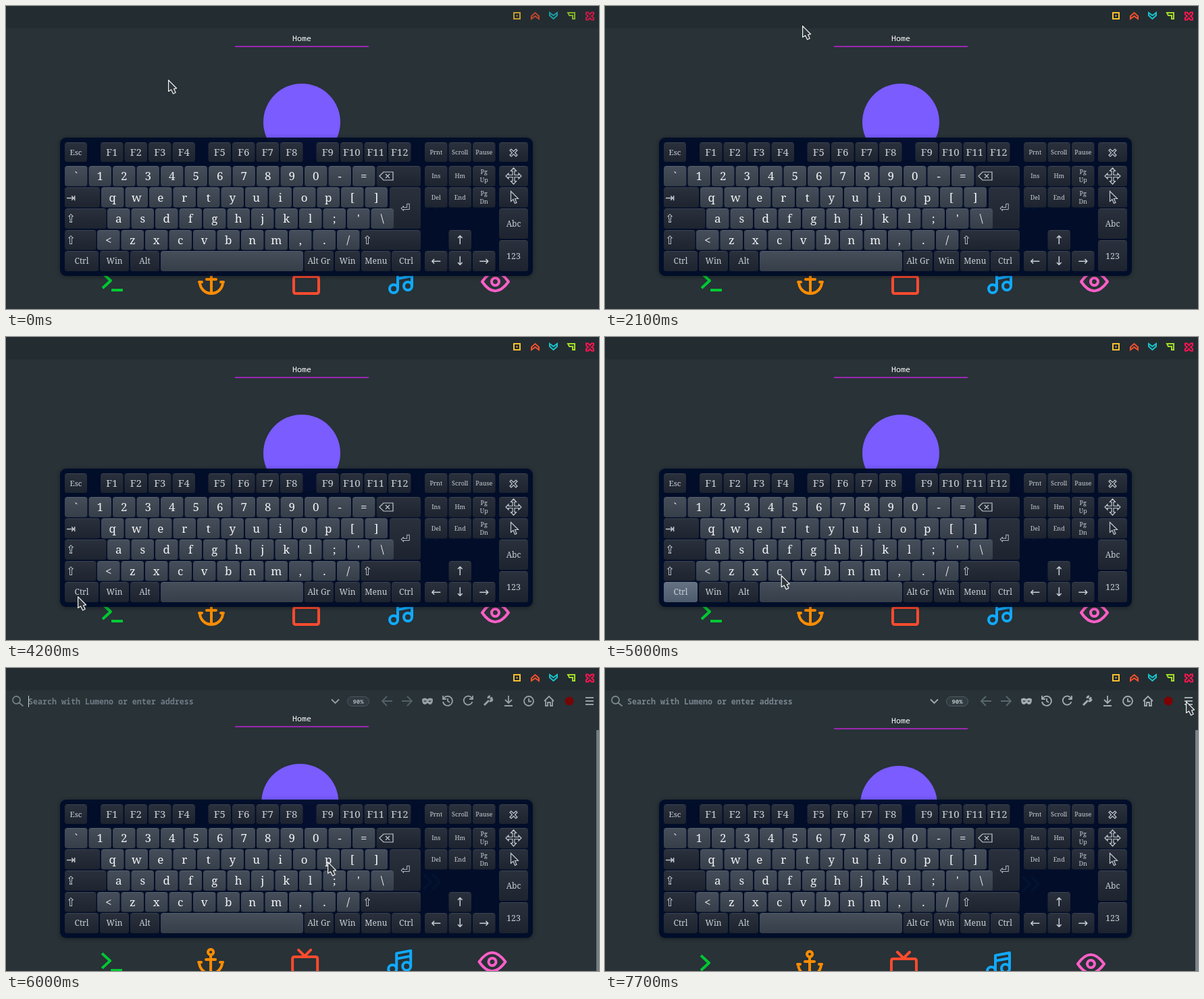
Animation of 878x449 px, one loop 8 s. Source, as an HTML page:

```html
<!DOCTYPE html>
<html lang="en">
<head>
<meta charset="utf-8">
<title>On-screen keyboard</title>
<style>
html, body { margin: 0; width: 100%; height: 100%; overflow: hidden; background: #283237; }
svg { display: block; }
.mono { font-family: "Noto Sans Mono", monospace; font-size: 11.67px; }
#board text, #popup text { font-family: "Noto Serif", "DejaVu Sans", serif; text-anchor: middle; }
#board .sym { font-family: "DejaVu Sans", sans-serif; }
.line { fill: none; stroke-width: 4; stroke-linecap: round; stroke-linejoin: round; }
.tool { fill: none; stroke: #a3adb2; stroke-width: 1.8; }
.glyph { fill: none; stroke: #c4c9cf; stroke-width: 1.2; }
</style>
</head>
<body>
<svg width="878" height="449" viewBox="0 0 878 449">
  <defs>
    <linearGradient id="light" x2="0" y2="1"><stop stop-color="#454e5a"/><stop offset="1" stop-color="#363e49"/></linearGradient>
    <linearGradient id="dark" x2="0" y2="1"><stop stop-color="#2a313d"/><stop offset="1" stop-color="#1d242f"/></linearGradient>
    <linearGradient id="lit" x2="0" y2="1"><stop stop-color="#647283"/><stop offset="1" stop-color="#4d5b6d"/></linearGradient>
    <clipPath id="barClip"><rect id="barArea" y="33" width="878" height="30"/></clipPath>
  </defs>

  <g id="page">
    <circle class="shift" data-dx="3" cx="438" cy="172" r="57" fill="#7a5cff"/>
    <path class="shift line" data-dx="3" stroke="#4af" d="M622 280l10 10-10 10m13-20l10 10-10 10"/>
    <path class="shift line" data-dx="1" style="stroke-linecap:butt" stroke="#00c832" d="M143 396l12 11-12 11M156 421h17"/>
    <path class="shift line" data-dx="1" stroke="#ff8c00" d="M304 398V426M297 405h14M286 409h4M318 409h4M287 409a17 17 0 0 0 34 0M304 390a4 4 0 1 0 .1 0"/>
    <path class="shift line" data-dx="2" stroke="#ff4b2e" d="M429 401h31q3 0 3 3v19q0 3-3 3h-31q-3 0-3-3v-19q0-3 3-3M435 391l9 9 9-9"/>
    <path class="shift line" data-dx="2" stroke="#10aaff" d="M580 419V396l21-4v23M580 404l21-4M580 419a6 6 0 1 0-12 0a6 6 0 1 0 12 0M601 415a6 6 0 1 0-12 0a6 6 0 1 0 12 0"/>
    <path class="shift line" data-dx="5" stroke="#ff5fc8" d="M705 408.500Q724 381 744 408.500Q724 436 705 408.500M730 408.500a5.500 5.500 0 1 0-11 0a5.500 5.500 0 1 0 11 0"/>
  </g>

  <rect width="878" height="33" fill="#232c31"/>
  <g id="buttons" fill="none" stroke-width="2">
    <path stroke="#fbc02d" d="M752 10h9v9h-9zM755.500 14.500h2"/>
    <path stroke="#f4512e" d="M778 15l5.500-5 5.500 5v4l-5.500-4-5.500 4z"/>
    <path stroke="#18c4cc" d="M805 10l5.500 4 5.500-4v4l-5.500 5-5.500-5z"/>
    <path stroke="#a4dc28" d="M832 10h10v9h-3v-5h-5z"/>
    <path stroke="#ff1450" d="M859 9.500h3l2.500 3 2.500-3h3v3l-3 2.500 3 2.500v3h-3l-2.500-3-2.500 3h-3v-3l3-2.500-3-2.500z"/>
  </g>

  <g clip-path="url(#barClip)">
    <g id="bar">
      <path class="tool" style="stroke:#7c8990" d="M21 47.500a5.500 5.500 0 1 0-11 0a5.500 5.500 0 1 0 11 0M19.500 51.500l6 5"/>
      <text class="mono" x="33" y="54" fill="#77848c" font-weight="600">Search with Lumeno or enter address</text>
      <rect id="caret" x="33" y="41" width="1" height="17" fill="#e0e4e6"/>
      <path class="tool" d="M482 46.500l5.500 5.500 5.500-5.500"/>
      <rect x="505.500" y="42.500" width="32" height="14" rx="7" fill="#313c42" stroke="#505c63"/>
      <text class="mono" x="521.500" y="53" fill="#b0b9be" font-weight="600" text-anchor="middle" style="font-size:9px">90%</text>
      <path class="tool" style="stroke:#59676f" d="M572 49h-15m7-7l-7 7 7 7M586 49h15m-7-7l7 7-7 7"/>
      <path fill="#a3adb2" fill-rule="evenodd" d="M616 46q4-3 8 0q4-3 8 0q0 9-5 8l-3-2-3 2q-5 1-5-8M618.500 48.500a2 1.500 0 0 0 4 0zM625.500 48.500a2 1.500 0 0 0 4 0z"/>
      <path class="tool" d="M648 45a7 7 0 1 1-1 5M647 41v5h5M654 45v4l3 2M690 45a6.500 6.500 0 1 0 .5 5M691 41v5h-5"/>
      <path class="tool" style="stroke-width:3" d="M708 55l7-7M720 43.500l-3 3M714 45q0-3 3-3M716 49q4 0 4-3"/>
      <path class="tool" d="M744 41v11m-5-5l5 5 5-5M738 56h12M781 49a7 7 0 1 0-14 0a7 7 0 1 0 14 0M774 45v4.500h4M797 49l7-7 7 7M799 48v8h3v-5h4v5h3v-8M858 44h12M858 49h12M858 54h12"/>
      <circle cx="834" cy="49" r="6.500" fill="#800000"/>
    </g>
  </g>
  <g id="tab">
    <text class="mono" x="424" y="52" fill="#fff">Home</text>
    <rect x="339" y="59" width="198" height="2" fill="#9c27b0"/>
  </g>
  <rect id="scroll" x="874" y="92" width="4" height="357" fill="#7b868c"/>

  <g id="board">
    <rect x="80" y="195" width="700" height="205" rx="9" fill="#010d2a" fill-opacity=".94" style="filter:drop-shadow(0 1px 3px rgba(0,0,0,.4))"/>
    <g id="keys"></g>
    <path class="glyph" d="M553 252l6-6h14v12h-14zM562 249l6 6m0-6l-6 6"/>
    <path class="glyph" d="M746 214l2-2 3.500 3.500 3.500-3.500 2 2-3.500 3.500 3.500 3.500-2 2-3.500-3.500-3.500 3.500-2-2 3.500-3.500z"/>
    <path class="glyph" d="M751.500 240l4 4.500h-2.500v6h6v-2.500l4 4-4 4v-2.500h-6v6h2.500l-4 4.500-4-4.500h2.500v-6h-6v2.500l-4-4 4-4v2.500h6v-6h-2.500z"/>
    <path class="glyph" d="M747.500 274.500v15l3.500-3 2.500 6 2.500-1-2.500-6h5z"/>
  </g>
  <g id="popup">
    <rect x="423" y="233" width="57" height="60" rx="7" fill="#566272"/>
    <text x="451" y="275" font-size="35" fill="#e8eaed">l</text>
  </g>
  <path id="cursor" fill="#30373c" stroke="#f4f4f4" stroke-width="1.200" stroke-linejoin="round" d="M.6.8V17.500l4-2.500 3 6 3.600-1.800-2.600-5.400 4-.8z"/>
</svg>
<script>
const $ = id => document.getElementById(id);
const PITCH = 35.5, WIDE = 33.5;
const keys = $("keys");

function add(tag, attrs, text = "") {
  const el = document.createElementNS("http://www.w3.org/2000/svg", tag);
  for (const name in attrs) el.setAttribute(name, attrs[name]);
  el.textContent = text;
  return keys.appendChild(el);
}

function key(x, y, w, h, label = "", size = 12, fill = "dark", lx = x + w / 2) {
  const box = add("rect", { x, y, width: w, height: h, rx: 3.5, fill: `url(#${fill})` });
  add("path", { d: `M${x + 3} ${y + .5}h${w - 6}`, stroke: "#fff", "stroke-opacity": .09 });
  const lines = label.split("|");
  lines.forEach((line, i) => add("text", {
    x: lx, y: y + h / 2 + size * .36 + (i - (lines.length - 1) / 2) * 12,
    "font-size": size, fill: fill == "light" ? "#f2f3f4" : "#ccd0d5",
    class: /[←-⏿]/.test(line) ? "sym" : ""
  }, line));
  return box;
}

function row(x, y, h, labels, size, fill) {
  return labels.split(" ").map((s, i) => key(x + i * PITCH, y, WIDE, h, s, size, fill));
}

key(87, 202, 33, 29, "Esc", 11.5);
row(140, 202, 29, "F1 F2 F3 F4", 15);
row(299.5, 202, 29, "F5 F6 F7 F8", 15);
row(459.5, 202, 29, "F9 F10 F11 F12", 15);
row(620, 202, 29, "Prnt Scroll Pause", 9);
row(87, 237, 30, "` 1 2 3 4 5 6 7 8 9 0 - =", 17, "light");
key(548.5, 237, 65.5, 30);
row(620, 237, 30, "Ins Hm Pg|Up", 9);
key(87, 268.5, 52, 30, "⇥", 17, "dark", 96);
row(141, 268.5, 30, "q w e r t y u i o p [ ]", 17, "light");
key(568, 268.5, 46, 61.5, "⏎", 17);
row(620, 268.5, 30, "Del End Pg|Dn", 9);
key(87, 300, 61.5, 30, "⇪", 17, "dark", 96);
const keyL = row(150, 300, 30, "a s d f g h j k l ; ' \\", 17, "light")[8];
key(87, 332, 46.5, 29.5, "⇧", 17, "dark", 96);
row(135, 332, 29.5, "< z x c v b n m , . /", 17, "light");
key(525.5, 332, 88.5, 29.5, "⇧", 17, "dark", 535);
key(655.5, 332, WIDE, 29.5, "↑", 18);
const ctrl = key(87, 363, 50, 30, "Ctrl");
key(139, 363, 43, 30, "Win");
key(184, 363, 43, 30, "Alt");
key(229, 363, 211, 30, "", 12, "light");
key(441.5, 363, 43.5, 30, "Alt Gr");
key(487, 363, 37, 30, "Win");
key(526, 363, 43.5, 30, "Menu");
key(571, 363, 43, 30, "Ctrl");
row(620, 363, 30, "← ↓ →", 18);
key(730, 202, 43, 29);
key(730, 237, 43, 30);
key(730, 268.5, 43, 30);
key(730, 300, 43, 45, "Abc");
key(730, 347, 43, 46, "123", 12.5);

// pointer path: time, x, y
const path = [
  [0, 240, 109], [800, 240, 109], [1300, 302, 37], [1700, 300, 26], [2000, 256, 23],
  [2400, 400, 46], [3000, 400, 46], [3100, 315, 247], [3700, 91, 380], [3900, 142, 389],
  [4100, 98, 389], [4200, 106, 384], [4600, 106, 384], [5500, 454, 314], [5800, 454, 314],
  [6500, 531, 219], [6700, 634, 173], [6800, 634, 173], [7700, 860, 49], [8000, 860, 49]
];

function pointer(t) {
  const i = path.findIndex(p => p[0] > t);
  const [t0, x0, y0] = path[i - 1], [t1, x1, y1] = path[i];
  const k = (t - t0) / (t1 - t0);
  return [x0 + (x1 - x0) * k, y0 + (y1 - y0) * k];
}

const within = (t, a, b) => t >= a && t < b;
const move = (el, x, y) => el.setAttribute("transform", `translate(${x} ${y})`);
const fade = (id, value) => $(id).setAttribute("opacity", value);
const shifting = document.querySelectorAll(".shift");

function draw(now) {
  const t = Math.floor(now % 8000 / 100) * 100; // screen refreshes every 100 ms
  const k = Math.min(1, Math.max(0, (t - 5760) / 300));
  const open = k * k * (3 - 2 * k);

  move($("cursor"), ...pointer(t));
  move($("tab"), 0, 30 * open);
  shifting.forEach(el => move(el, -el.dataset.dx * open, 30 * open));
  $("barArea").setAttribute("height", 30 * open);
  fade("bar", open);
  fade("scroll", open);
  fade("buttons", t < 400 ? .75 : 1);
  fade("caret", t < 7200 ? 1 : 0);
  fade("popup", t == 5700 ? 1 : t == 5800 ? .33 : 0);
  ctrl.setAttribute("fill", `url(#${within(t, 4400, 5800) ? "lit" : "dark"})`);
  keyL.setAttribute("fill", `url(#${within(t, 5700, 5900) ? "lit" : "light"})`);
  requestAnimationFrame(draw);
}
requestAnimationFrame(draw);
</script>
</body>
</html>
```
